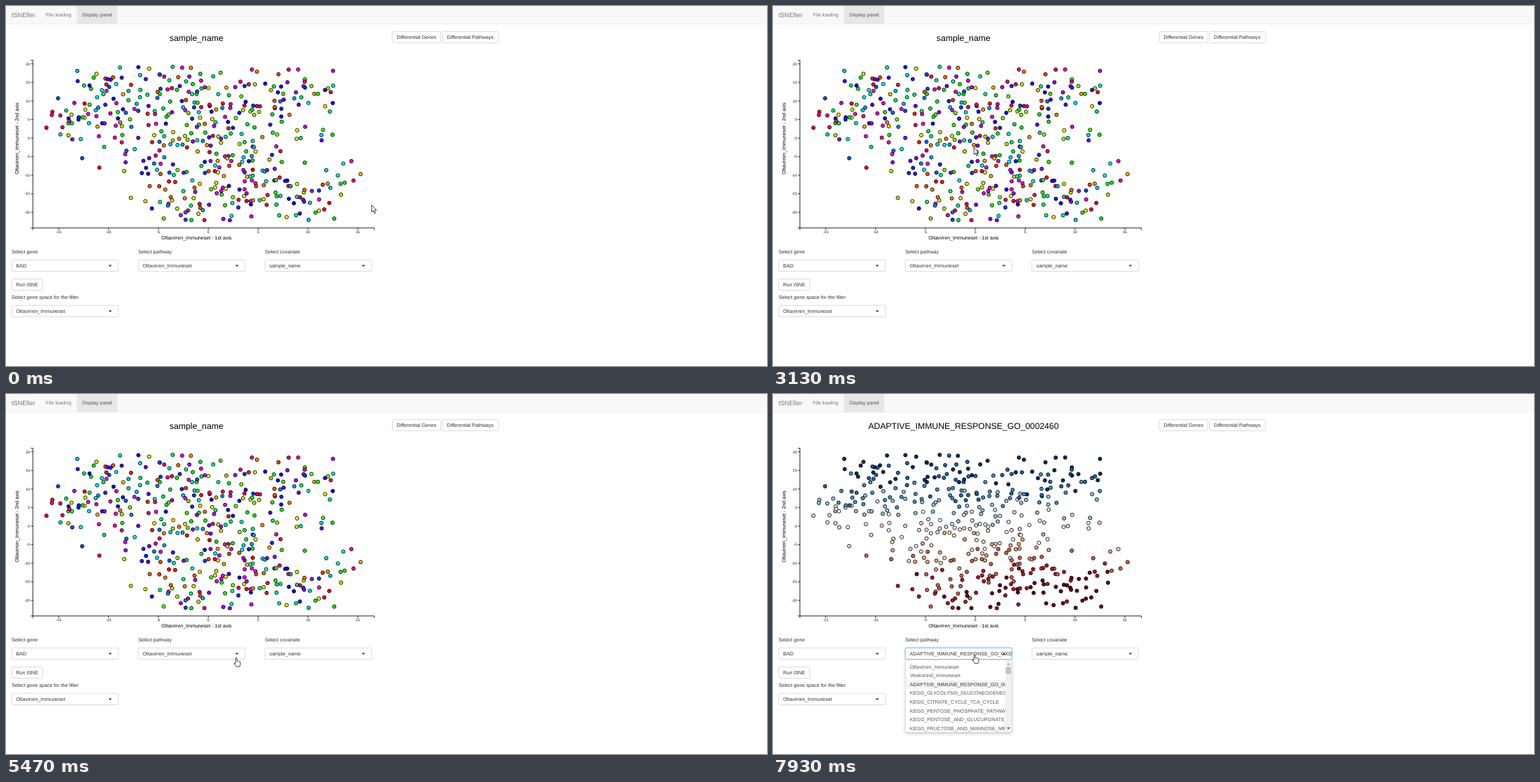
An HTML page that plays this animation: 1088 by 515 pixels, repeating every 8 s.

```html
<!DOCTYPE html>
<html lang="en">
<head>
<meta charset="utf-8">
<title>tSNEfier</title>
<style>
  html, body { margin: 0; width: 100%; height: 100%; overflow: hidden; background: #fff; }
  svg { display: block; width: 1088px; height: 515px; cursor: default; }
  text { font: 7.12px "Liberation Sans", Arial, sans-serif; fill: #333; text-rendering: geometricPrecision; white-space: pre; }
  .nav { fill: #777; }
  .plot text { fill: #000; }
  .plot .tick { font-size: 5.1px; }
  .axis { fill: none; stroke: #000; stroke-width: .8; }
  .box { fill: #fff; stroke: #ccc; stroke-width: .7; }
  .focus { stroke: #66afe9; filter: drop-shadow(0 0 1.5px rgba(102, 175, 233, .7)); }
  .dot { stroke: #000; stroke-width: .85; }
  .tip { font-size: 6.05px; }
  .menu { filter: drop-shadow(0 2px 2px rgba(0, 0, 0, .2)); }
  .pointer { fill: #fff; stroke: #000; stroke-width: .75; stroke-linejoin: round; }
</style>
</head>
<body>
<svg id="stage" viewBox="0 0 1088 515">
  <rect width="1088" height="26" fill="#f8f8f8"/>
  <rect y="25.6" width="1088" height=".6" fill="#e7e7e7"/>
  <rect x="101.3" width="57.7" height="25.8" fill="#e7e7e7"/>
  <text class="nav" x="8" y="16.3" style="font-size:9.15px">tSNEfier</text>
  <text class="nav" x="57" y="15.3">File loading</text>
  <text x="109" y="15.3" style="fill:#555">Display panel</text>
</svg>
<script>
const LOOP = 8000, STEP = 200 / 3;
const PANEL = "Oltavirren_Immuneset";
const PATHWAY = "ADAPTIVE_IMMUNE_RESPONSE_GO_0002460";
const ITEMS = [PANEL, "Veskotrind_Immuneset", PATHWAY,
  "KEGG_GLYCOLYSIS_GLUCONEOGENESIS", "KEGG_CITRATE_CYCLE_TCA_CYCLE",
  "KEGG_PENTOSE_PHOSPHATE_PATHWAY", "KEGG_PENTOSE_AND_GLUCURONATE_INTERCONVERSIONS",
  "KEGG_FRUCTOSE_AND_MANNOSE_METABOLISM"];
const ROW_TOP = 383.9, ROW_H = 12.58;
const stage = document.getElementById("stage");

function add(tag, attrs = {}, parent = stage, content) {
  const el = document.createElementNS("http://www.w3.org/2000/svg", tag);
  for (const key in attrs) el.setAttribute(key, attrs[key]);
  if (content !== undefined) el.textContent = content;
  parent.append(el);
  return el;
}
const label = (x, y, content, attrs = {}, parent = stage) => add("text", { x, y, ...attrs }, parent, content);
const path = (d, attrs = {}, parent = stage) => add("path", { d, ...attrs }, parent);
const show = (el, on) => el.setAttribute("visibility", on ? "visible" : "hidden");
const clamp = (v, lo, hi) => Math.max(lo, Math.min(hi, v));

function clip(id, x, y, width, height) {
  add("rect", { x, y, width, height }, add("clipPath", { id }));
  return { "clip-path": `url(#${id})` };
}

// Form controls
function button(x, y, width, content) {
  add("rect", { class: "box", x, y, width, height: 16, rx: 2 });
  label(x + 6.2, y + 10.4, content);
}
const DOWN = "l5 0l-2.5 2.6z", UP = "m0 2.5l5 0l-2.5 -2.6z";
function select(x, y, caption, value) {
  label(x - .3, y - 9.8, caption);
  const box = add("rect", { class: "box", x, y, width: 152.5, height: 16.3, rx: 2 });
  const text = label(x + 6.4, y + 10.5, value, clip(`value${x}-${y | 0}`, x, y, 152.5, 16));
  const arrow = path(`M${x + 138.3} ${y + 7.2}${DOWN}`, { fill: "#333" });
  return { box, text, arrow };
}
button(552.3, 36.6, 69.5, "Differential Genes");
button(624.3, 36.6, 79.8, "Differential Pathways");
button(8.2, 390.6, 44.3, "Run tSNE");
select(8.2, 363.3, "Select gene", "BAD");
const pathway = select(189.2, 363.3, "Select pathway", PANEL);
select(370.2, 363.3, "Select covariate", "sample_name");
select(8.2, 428.3, "Select gene space for the filter", PANEL);

// Plot axes
const plot = add("g", { class: "plot" });
const title = label(272.3, 50, "", { "text-anchor": "middle", style: "font-size:12.25px" }, plot);
path("M35.5 77.5H38.5V317.5H35.5M38.5 320.5V317.5H526.5V320.5", { class: "axis" }, plot);
for (let v = -15; v <= 15; v += 5) {
  const x = 289.2 + v * 14.26;
  path(`M${x} 317.5v3`, { class: "axis" }, plot);
  label(x, 325.2, v, { class: "tick", "text-anchor": "middle" }, plot);
}
for (let v = -20; v <= 20; v += 5) {
  const y = 189 - v * 5.31;
  path(`M38.5 ${y}h-3`, { class: "axis" }, plot);
  label(34, y + 1.8, v, { class: "tick", "text-anchor": "end" }, plot);
}
label(272.5, 333.8, PANEL + " - 1st axis", { "text-anchor": "middle" }, plot);
label(0, 0, PANEL + " - 2nd axis", { "text-anchor": "middle", transform: "translate(18 189.5) rotate(-90)" }, plot);

// Hover labels: start, end, point x, point y
const TIPS = [
  [270, 330, 455, 291], [1520, 1660, 344, 268], [1930, 2060, 305, 231],
  [2870, 2990, 291, 209], [3660, 3790, 281.5, 193], [3790, 3920, 285, 181],
  [4260, 4330, 303, 238], [6850, 7250, 264.5, 285.5]
];

// Number of samples in each cell of a grid laid over the plot
const DENSITY = [
  [0, 4, 6, 4, 5, 7, 2, 1, 2, 3, 1, 0],
  [0, 3, 7, 4, 6, 7, 5, 6, 5, 6, 7, 0],
  [3, 7, 5, 6, 5, 9, 6, 8, 8, 4, 4, 0],
  [9, 8, 7, 5, 5, 6, 6, 6, 4, 2, 0, 0],
  [2, 2, 4, 1, 7, 6, 7, 4, 3, 3, 4, 0],
  [0, 1, 1, 4, 5, 4, 6, 8, 3, 0, 0, 0],
  [0, 0, 2, 5, 6, 4, 8, 8, 6, 1, 1, 3],
  [0, 0, 0, 1, 5, 3, 7, 8, 6, 5, 3, 4],
  [0, 0, 0, 2, 4, 5, 4, 8, 8, 8, 5, 1],
  [0, 0, 0, 0, 3, 9, 3, 4, 1, 3, 4, 0]
];
const SCALE = ["#053061", "#2166ac", "#4393c3", "#92c5de", "#d1e5f0", "#f7f7f7",
  "#fddbc7", "#f4a582", "#d6604d", "#b2182b", "#67001f"];
let seed = 20460;
function random() {
  seed = (seed * 1664525 + 1013904223) % 4294967296;
  return seed / 4294967296;
}
const dots = [];
function addDot(x, y) {
  const depth = clamp((y - 190) / 115, -1, 1);
  const level = 4.9 + 5.2 * Math.sin(depth * Math.PI / 2)
    + Math.max(depth, 0) * (x - 330) / 100 + (random() + random() - 1) * 2;
  dots.push({
    x, y,
    sample: `hsl(${random() * 360 | 0} 100% 50%)`,
    score: SCALE[clamp(Math.round(level), 0, 10)],
    el: add("circle", { class: "dot", cx: x, cy: y, r: 2.55 }, plot)
  });
}
const gap = p => Math.min(...dots.map(d => Math.hypot(d.x - p.x, d.y - p.y)));
for (const [, , x, y] of TIPS) addDot(x, y);
DENSITY.forEach((row, r) => row.forEach((count, c) => {
  for (let i = 0; i < count; i++) {
    const options = [0, 1].map(() => ({ x: 57 + (c + random()) * 37.5, y: 86 + (r + random()) * 22.1 }));
    const best = gap(options[0]) > gap(options[1]) ? options[0] : options[1];
    addDot(best.x, best.y);
  }
}));

// Hover label
const tip = add("g");
add("rect", { x: -42, y: -18, width: 84, height: 11.8, rx: 1.2, fill: "#222", "fill-opacity": .92 }, tip);
path("M-2.5 -6.3h5l-2.5 3z", { fill: "#222" }, tip);
label(-39, -10, "names", { class: "tip", style: "fill:#fff;font-weight:bold" }, tip);
label(-17.5, -10, "SKCM-FS-A1ZN-TM", { class: "tip", style: "fill:#e01010" }, tip);

// Pathway list
const menu = add("g", { class: "menu" });
add("rect", { x: 189.2, y: 380.4, width: 152.3, height: 103.5, fill: "#fff", stroke: "#d0d0d0", "stroke-width": .6 }, menu);
const highlight = add("rect", { x: 189.5, width: 142.5, height: ROW_H, fill: "#f5f5f5" }, menu);
const rows = add("g", clip("rows", 189.5, 381, 142.7, 102.5), menu);
const items = ITEMS.map((name, i) => label(195.7, ROW_TOP + ROW_H * i + 8.8, name, {}, rows));
add("rect", { x: 332.2, y: 381, width: 8.8, height: 102.4, fill: "#f1f1f1" }, menu);
add("rect", { x: 332.8, y: 390.6, width: 7.4, height: 9.8, fill: "#c1c1c1" }, menu);
path("M334.1 385" + UP, { fill: "#a3a3a3" }, menu);
path("M334.1 477" + DOWN, { fill: "#505050" }, menu);

// Pointer: time, x, y
const ROUTE = [
  [0, 522.7, 284.6], [300, 455, 294], [600, 305, 345], [700, 283.5, 351], [870, 306, 352],
  [1070, 320, 354], [1330, 375.7, 274.5], [1460, 385, 267], [1600, 345, 269], [1730, 318, 255],
  [2000, 306, 232], [2300, 276, 222], [2600, 290, 219],
  [2930, 291, 210], [3130, 287.3, 202.5], [3270, 287, 201.5], [3500, 287, 201.5],
  [3700, 282, 194], [3870, 283.5, 182], [3930, 283.5, 183], [4070, 283.5, 183],
  [4300, 304, 239], [4700, 414, 380], [4930, 421, 375.5], [5070, 421, 375.5],
  [5470, 329.3, 377.3], [5800, 329.3, 377.3], [6400, 263, 413], [6600, 263, 413],
  [6930, 265.2, 282.5], [7000, 265, 283], [7200, 265, 283], [7530, 288.3, 372.6], [LOOP, 288.3, 372.6]
];
const arrow = path("M0 0V10L2.3 8L4 12L5.6 11.3L4 7.5H7Z", { class: "pointer" });
const hand = path("M-1 8V1Q-1 0 0 0Q1 0 1 1V5Q2 4.3 2.7 5.2Q3.6 4.6 4.3 5.6Q5.3 5.2 5.7 6.3V9Q5.7 11 4.7 12.7H0L-3 8.6Q-3.4 7 -2 7.4Z", { class: "pointer" });

function pointerAt(t) {
  const i = Math.max(1, ROUTE.findIndex(p => p[0] >= t));
  const [t0, x0, y0] = ROUTE[i - 1], [t1, x1, y1] = ROUTE[i];
  const u = (t - t0) / (t1 - t0), k = u * u * (3 - 2 * u);
  return [x0 + (x1 - x0) * k, y0 + (y1 - y0) * k];
}

let scored = null;
function paint(useScore) {
  if (useScore === scored) return;
  scored = useScore;
  title.textContent = scored ? PATHWAY : "sample_name";
  for (const d of dots) d.el.setAttribute("fill", scored ? d.score : d.sample);
}

function draw() {
  const now = performance.now() % LOOP;
  const t = Math.floor((now + 4) / STEP) * STEP + 1;
  const [x, y] = pointerAt(Math.min(t, LOOP));
  const chosen = t > 6590, focused = t > 5790;
  const open = focused && !chosen || t > 7920;
  paint(t > 6660);

  pathway.box.classList.toggle("focus", focused);
  pathway.text.textContent = chosen ? PATHWAY : PANEL;
  pathway.arrow.setAttribute("d", "M327.5 370.5" + (open ? UP : DOWN));
  show(menu, open);
  const hovered = Math.floor((y - ROW_TOP) / ROW_H);
  const active = hovered >= 0 ? hovered : chosen ? 2 : 0;
  highlight.setAttribute("y", ROW_TOP + ROW_H * active);
  items.forEach((el, i) => { el.style.fill = i === active ? "#333" : "#555"; });

  const hover = TIPS.find(([from, to]) => t >= from && t < to);
  show(tip, hover);
  if (hover) tip.setAttribute("transform", `translate(${hover[2]} ${hover[3]})`);

  const overSelect = y > 363 && y < 380 && (x > 189 && x < 342 || x > 370 && x < 523);
  const clickable = overSelect || open;
  show(hand, clickable);
  show(arrow, !clickable);
  (clickable ? hand : arrow).setAttribute("transform", `translate(${x} ${y})`);
  requestAnimationFrame(draw);
}
draw();
</script>
</body>
</html>
```
